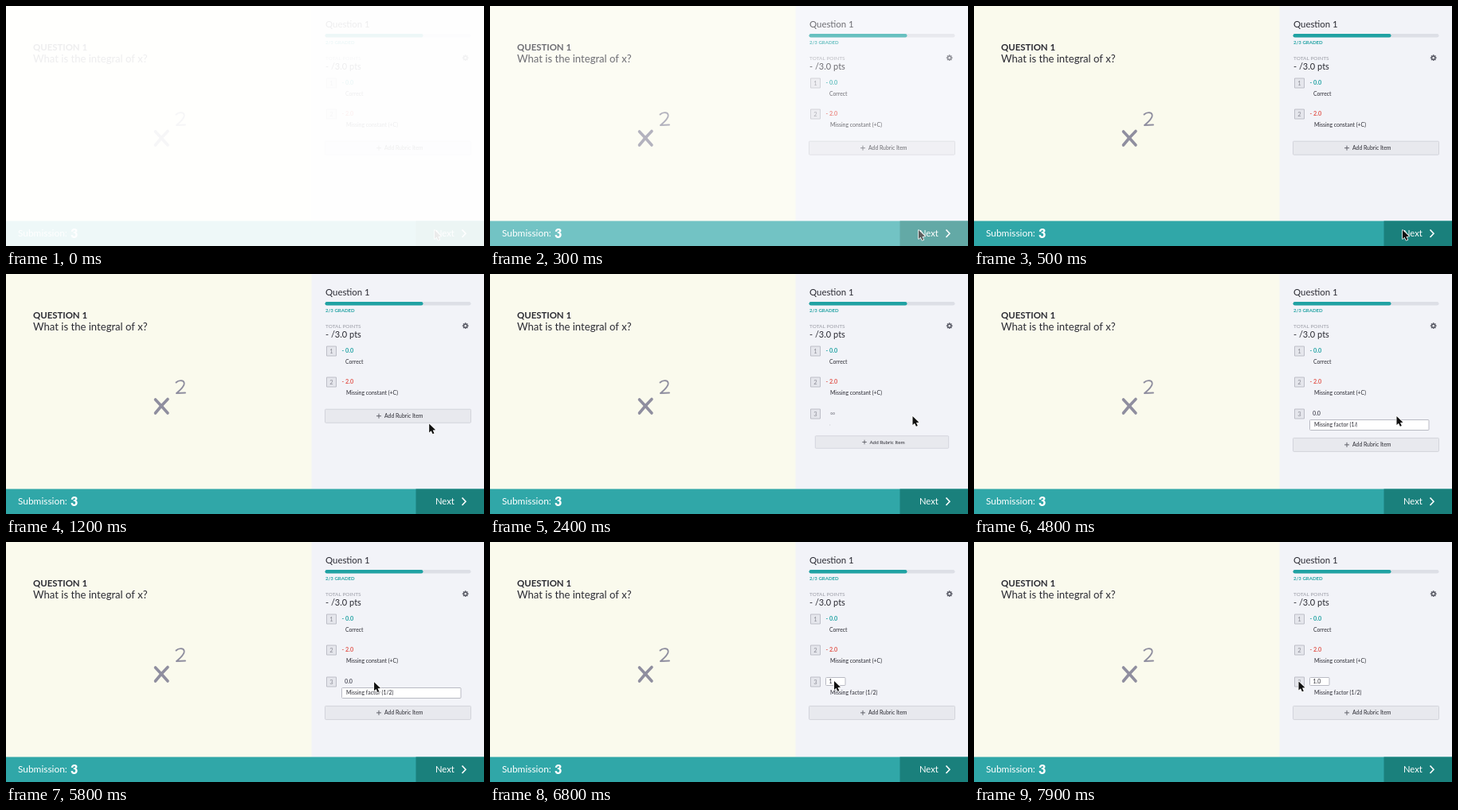
Animation of 600 by 302 pixels, one loop 8 s. Source, as an HTML page with a canvas:

```html
<!DOCTYPE html>
<html lang="en">
<head>
<meta charset="utf-8">
<title>Grading a question</title>
<style>
  html, body { margin: 0; width: 100%; height: 100%; overflow: hidden; background: #fff; }
  canvas { display: block; width: 600px; height: 302px; }
</style>
</head>
<body>
<canvas id="stage" width="600" height="302"></canvas>
<script>
const ctx = document.getElementById('stage').getContext('2d');
const LOOP = 8000;
const INK = '#2b2b33', TEAL = '#20a2a3', GREY = '#8b8c96';
const ANSWER = 'Missing factor (1/2)';

const clamp = v => Math.max(0, Math.min(1, v));
const span = (t, a, b) => clamp((t - a) / (b - a));
const inOut = p => p < .5 ? 4 * p ** 3 : 1 - 4 * (1 - p) ** 3;
const out = p => 1 - (1 - p) ** 3;

// Eased value through [time, value] stops
function track(t, stops) {
  let value = stops[0][1];
  for (let i = 1; i < stops.length; i++) {
    const [a, from] = stops[i - 1], [b, to] = stops[i];
    if (t >= a) value = from + (to - from) * inOut(span(t, a, b));
  }
  return value;
}

function text(str, x, y, size, color = INK, weight = 400, align = 'left') {
  ctx.font = `${weight} ${size}px Lato, "Open Sans", sans-serif`;
  ctx.textAlign = align;
  ctx.textBaseline = 'alphabetic';
  ctx.fillStyle = color;
  ctx.fillText(str, x, y);
}

function rect(x, y, w, h, fill, r = 0, stroke) {
  ctx.beginPath();
  ctx.roundRect(x, y, w, h, r);
  ctx.fillStyle = fill;
  ctx.fill();
  if (stroke) {
    ctx.strokeStyle = stroke;
    ctx.lineWidth = 1;
    ctx.stroke();
  }
}

function line(points, color, width) {
  ctx.beginPath();
  points.forEach(([x, y]) => ctx.lineTo(x, y));
  ctx.strokeStyle = color;
  ctx.lineWidth = width;
  ctx.stroke();
}

function scaled(x, y, s, draw) {
  if (s <= 0) return;
  ctx.save();
  ctx.translate(x, y);
  ctx.scale(s, s);
  ctx.translate(-x, -y);
  draw();
  ctx.restore();
}

function badge(n, y) {
  rect(402.5, y - 6, 12, 12, '#e5e6ec', 0, '#bdbec7');
  text(n, 408.5, y + 2.8, 7.6, GREY, 400, 'center');
}

function handwriting() {
  const color = '#8f8e9f';
  ctx.lineCap = ctx.lineJoin = 'round';
  line([[187.5, 158], [195, 166], [203, 175]], color, 3.6);
  line([[203, 157.5], [195, 166], [187.5, 175]], color, 3.6);
  ctx.beginPath();
  ctx.moveTo(213.5, 136.5);
  ctx.bezierCurveTo(217, 133, 225, 133, 223.5, 139);
  ctx.bezierCurveTo(222, 144, 217, 147, 214, 150);
  ctx.lineTo(225, 149.5);
  ctx.lineWidth = 1.9;
  ctx.stroke();
  ctx.lineCap = 'butt';
  ctx.lineJoin = 'miter';
}

function gear(x, y) {
  ctx.beginPath();
  for (let i = 0; i < 8; i++) {
    const a = i * Math.PI / 4;
    ctx.moveTo(x, y);
    ctx.lineTo(x + 3.9 * Math.cos(a), y + 3.9 * Math.sin(a));
  }
  ctx.strokeStyle = '#5f606b';
  ctx.lineWidth = 1.5;
  ctx.stroke();
  ctx.beginPath();
  ctx.arc(x, y, 2.9, 0, 7);
  ctx.fillStyle = '#5f606b';
  ctx.fill();
  ctx.beginPath();
  ctx.arc(x, y, 1.3, 0, 7);
  ctx.fillStyle = '#f2f3f8';
  ctx.fill();
}

function page() {
  rect(0, 0, 384, 271, '#fafaed');
  rect(383.5, 0, 217, 271, '#f2f3f8');
  text('QUESTION 1', 34, 56, 11.4, INK, 700);
  text('What is the integral of x?', 34, 71, 13.1);
  handwriting();

  text('Question 1', 401, 26.5, 11.4);
  rect(400.5, 35, 183, 4.6, '#dddfe6', 2.3);
  rect(400.5, 35, 123, 4.6, TEAL, 2.3);
  text('2/3 GRADED', 401, 47.8, 6.1, TEAL, 700);
  text('TOTAL POINTS', 401, 67.5, 6.5, '#9a9ba5');
  text('- /3.0 pts', 401, 79.5, 11);
  gear(576.7, 65.2);

  badge('1', 97);
  text('- 0.0', 421.5, 99.2, 7.3, TEAL, 700);
  text('Correct', 426, 113, 6.8);
  badge('2', 136);
  text('- 2.0', 421.5, 138, 7.3, '#e25a52', 700);
  text('Missing constant (+C)', 427, 152, 6.9);

  rect(0, 270.5, 600, 31.5, '#30a7a8');
  rect(514.5, 270.5, 86, 31.5, '#1a807c');
  text('Submission:', 15, 290.2, 11.9, '#fff');
  text('3', 81, 291.5, 16, '#fff', 900);
  text('Next', 539, 290.2, 11.2, '#fff');
  line([[572.5, 281.5], [577, 286.2], [572.5, 291]], '#fff', 1.6);
}

function addButton(t) {
  const y = 178.7 + 36.2 * out(span(t, 1800, 2900));
  const s = track(t, [[1800, 1], [2000, .91], [2300, .91], [2750, 1.012], [2900, 1]]);
  scaled(492, y, s, () => {
    rect(400.5, y - 8.5, 183, 17, '#e8e9ee', 1, '#d3d4db');
    line([[465, y], [471, y]], '#55565f', .9);
    line([[468, y - 3], [468, y + 3]], '#55565f', .9);
    text('Add Rubric Item', 475, y + 2.4, 6.85);
  });
}

function caretAlpha(t) {
  if (t >= 3900) return t < 5100 ? 1 : 0;
  return t < 3400 ? 1 - span(t, 3050, 3150) : span(t, 3550, 3650);
}

function typed(t) {
  const n = t < 4700 ? (t - 3850) / 50 : 17 + (t - 4700) / 100;
  return ANSWER.slice(0, Math.max(0, Math.floor(n)));
}

function descriptionField(t) {
  if (t >= 6300) {
    text(ANSWER, 427, 192.2, 6.9);
    return;
  }
  ctx.save();
  ctx.globalAlpha *= span(t, 2450, 2650);
  scaled(496, 190, track(t, [[2450, .85], [2800, 1.01], [2900, 1]]), () =>
    rect(421.5, 183.5, 149.5, 13, '#fff', 1, '#b9bac3'));
  ctx.restore();

  const str = typed(t);
  text(str, 427, 192.2, 6.9);
  ctx.save();
  ctx.globalAlpha *= caretAlpha(t);
  const x = 426.7 + ctx.measureText(str).width;
  scaled(x, 190, span(t, 2300, 2700), () =>
    line([[x, 187], [x, 192.5]], '#666771', .8));
  ctx.restore();
}

function pointsField(t) {
  if (t < 6300) {
    scaled(430, 176, track(t, [[2250, 0], [2550, 1]]), () =>
      text('0.0', 430, 178.2, 7.3, '#5d5e69', 700, 'center'));
    return;
  }
  rect(421.5, 170.5, 24.5, 10, '#fff', 1, '#b9bac3');
  if (t >= 6500 && t < 6800) rect(425, 172, 11, 7, '#b5d5f5');
  const str = t < 6800 ? '0.0' : '1.0'.slice(0, 1 + Math.floor((t - 6800) / 100));
  text(str, 425.5, 178.1, 7);
}

function cursor(t) {
  const x = track(t, [[700, 538], [1400, 530.5], [5300, 530.5], [6170, 432], [7450, 432], [7880, 407.5]]);
  const y = track(t, [[700, 282], [1400, 179], [5300, 179], [6170, 175], [7450, 175], [7880, 175.5]]);
  const shape = [[0, 0], [0, 11], [2.5, 8.7], [4.4, 12.8], [6.3, 12], [4.5, 8], [8, 7.8]];
  ctx.beginPath();
  shape.forEach(([dx, dy]) => ctx.lineTo(x + dx, y + dy));
  ctx.closePath();
  ctx.lineJoin = 'round';
  ctx.strokeStyle = '#fff';
  ctx.lineWidth = 1.5;
  ctx.stroke();
  ctx.fillStyle = '#111';
  ctx.fill();
  ctx.lineJoin = 'miter';
}

function draw(t) {
  ctx.globalAlpha = 1;
  page();
  if (t > 1900) {
    scaled(408.5, 176, track(t, [[1950, 0], [2300, 1]]), () => badge('3', 176));
    pointsField(t);
    descriptionField(t);
  }
  addButton(t);
  cursor(t);

  // White veil lifting at the start
  ctx.globalAlpha = clamp(.92 - t / 500);
  rect(0, 0, 600, 302, '#fff');
}

const start = performance.now();
function tick() {
  draw((performance.now() - start) % LOOP);
  requestAnimationFrame(tick);
}
tick();
</script>
</body>
</html>
```
